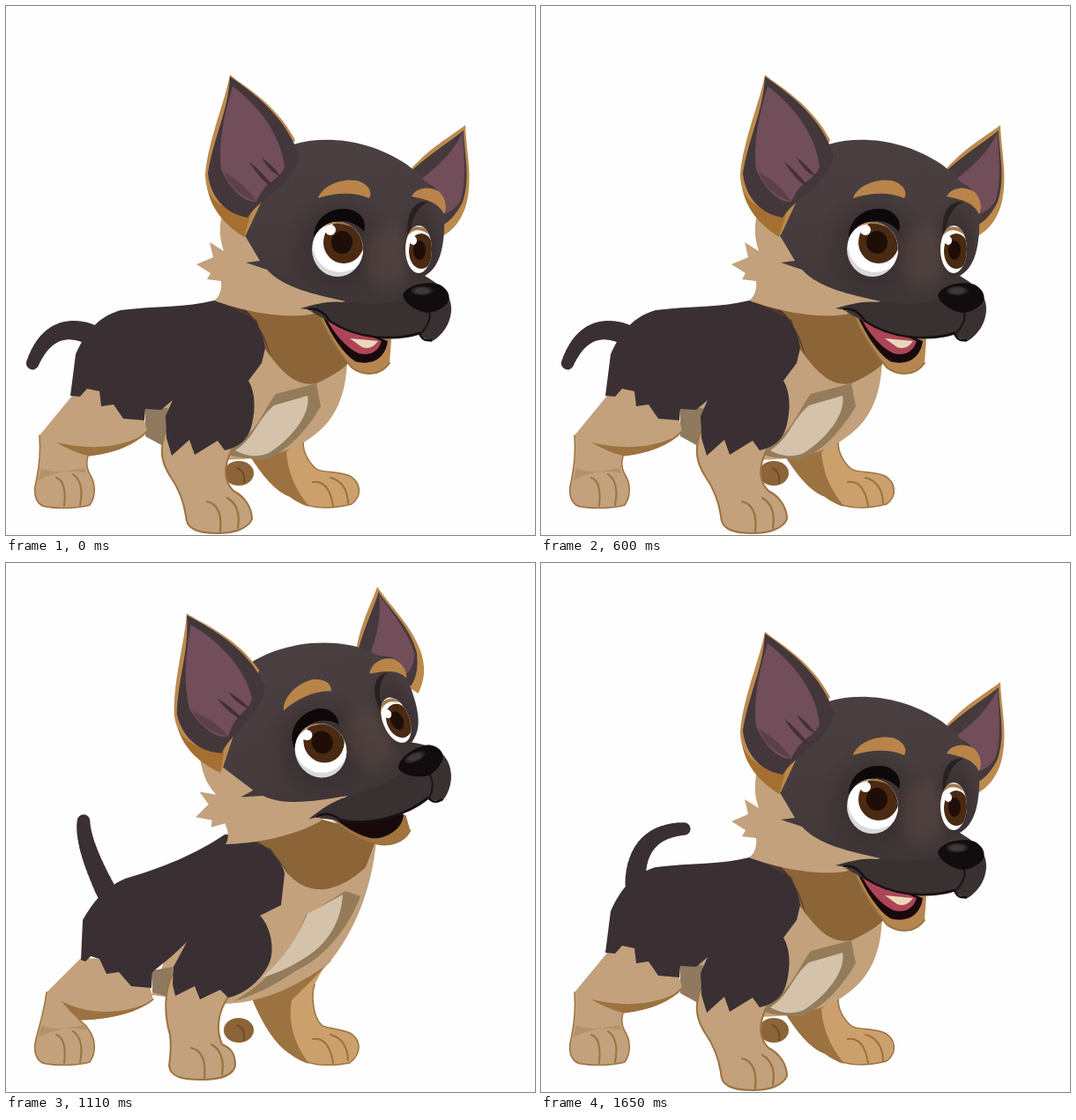
Recreate the animation shown at these times as an HTML page with a canvas. Size 600x600 px, loop 1710 ms.

```html
<!DOCTYPE html>
<html lang="en">
<head>
<meta charset="utf-8">
<title>Puppy</title>
<style>
html, body { margin: 0; width: 100%; height: 100%; overflow: hidden; background: #fefefe; }
canvas { display: block; width: 100vmin; height: 100vmin; }
</style>
</head>
<body>
<canvas id="stage" width="600" height="600"></canvas>
<script>
const ctx = document.getElementById('stage').getContext('2d');
const LOOP = 1710, STEP = 30, LAST = 1650, WAG = 300;
const TAN = '#c2a17c', GOLD = '#bb8a4e', BROWN = '#8b6438', EDGE = '#9c7240';
const COAT = '#3a3033', FACE = '#4a4042', PINK = '#714e59';

// Poses: rise, crouch, head dx, dy, tilt, left ear, right ear, jaw, blink
const REST = [0, 0, 0, 0, 0, 0, 0, 0, 0];
const DIP = [0, 1.1, 4, 14, 5, -14, 26, -1, 0];
const LOW = [0, 1, 2, 8, 3, -10, 15, -1, 0];
const PERK = [0, 0, 2, 1, 1, 10, 0, -.5, 0];
const BARK = [1, 0, 3, 0, -18, 7, -3, 1, 1];
const PROUD = [1, 0, -1, -5, -22, 15, -11, -1, 0];
const KEYS = [
  [0, REST], [140, DIP], [200, LOW], [270, PERK], [300, REST],
  [440, DIP], [500, LOW], [570, PERK], [600, REST],
  [680, DIP], [770, [1, 0, 1, -8, -21, 14, -8, .6, 1]], [810, BARK], [930, BARK],
  [1020, [1, 0, 0, -5, -21, 14, -9, -.6, 0]], [1110, PROUD],
  [1190, [1, 0, -1, -14, -26, 20, -13, -1, 0]], [1350, DIP], [1410, LOW],
  [1530, PERK], [1620, REST], [LOOP, REST]
];

function poseAt(t) {
  const i = KEYS.findIndex(k => k[0] > t);
  const [t0, a] = KEYS[i - 1], [t1, b] = KEYS[i];
  const u = (t - t0) / (t1 - t0), e = u * u * (3 - 2 * u);
  return a.map((v, n) => v + (b[n] - v) * e);
}

// Weighted mean of paths that share one structure
function blend(paths, weights) {
  const nums = paths.map(p => p.match(/\d+/g));
  let n = 0;
  return paths[0].replace(/\d+/g, () => {
    const v = weights.reduce((s, w, i) => s + w * nums[i][n], 0);
    n++;
    return v.toFixed(2);
  });
}

function fill(path, color) {
  ctx.fillStyle = color;
  ctx.fill(new Path2D(path));
}

function line(path, color, width) {
  ctx.strokeStyle = color;
  ctx.lineWidth = width;
  ctx.stroke(new Path2D(path));
}

// Strokes a path up to its first straight segment
const rim = (path, width) => line(path.replace(/L.*$/, ''), EDGE, width);

function oval(x, y, rx, ry, color, turn = 0) {
  ctx.fillStyle = color;
  ctx.beginPath();
  ctx.ellipse(x, y, rx, ry, turn, 0, 7);
  ctx.fill();
}

function glow(x, y, rx, ry, rgb, alpha) {
  ctx.save();
  ctx.translate(x, y);
  ctx.scale(rx, ry);
  const g = ctx.createRadialGradient(0, 0, .5, 0, 0, 1);
  g.addColorStop(0, `rgba(${rgb},${alpha})`);
  g.addColorStop(1, `rgba(${rgb},0)`);
  oval(0, 0, 1, 1, g);
  ctx.restore();
}

function pivot(x, y, deg, scale, draw) {
  ctx.save();
  ctx.translate(x, y);
  ctx.rotate(deg * Math.PI / 180);
  ctx.scale(scale, scale);
  ctx.translate(-x, -y);
  draw();
  ctx.restore();
}

// Resting and risen shapes; the front leg also has a crouched one
const BODY = {
  torso: ['M180 440L270 345L300 350C305 370 335 385 350 385L387 400C386 440 375 470 345 490C320 510 270 517 235 514L160 485Z',
    'M180 450L270 320L310 320C325 340 375 345 400 335L420 315C415 370 395 420 365 455C330 480 290 500 245 500L165 490Z'],
  chest: ['M244 506C285 490 290 460 306 440L352 428L357 454C342 480 320 505 295 514C275 514 258 512 244 506Z',
    'M258 497C290 480 320 450 340 400L385 372L402 378C390 410 365 445 330 462C305 478 285 490 258 497Z'],
  light: ['M260 504C282 490 284 470 304 453L342 442C346 462 325 490 298 507C284 513 270 510 260 504Z',
    'M290 470C315 450 330 425 342 398L382 376C380 405 368 425 350 440C330 455 310 465 290 470Z'],
  neck: ['M245 335L296 392C315 418 330 432 352 428C370 420 385 410 390 403L384 350L300 335Z',
    'M255 305L312 340C322 360 340 372 362 370C385 366 400 352 408 345L422 308L300 275Z'],
  collar: ['M240 334C270 336 292 360 300 398L284 356Z', 'M252 306C285 312 306 325 322 356L300 324Z'],
  belly: ['M158 456L184 456L178 499L158 488Z', 'M166 462L190 458L183 492L166 487Z'],
  patch: ['M73 442L79 395C90 370 105 352 130 345C170 340 205 342 236 334C265 330 290 355 294 388L290 405L275 425C283 438 283 458 279 474C275 492 265 500 248 504L240 493L214 509L208 492L188 510L182 490L181 465L189 447L176 458L158 457L157 470L133 468L122 452L108 454L106 437L92 434L84 443Z',
    'M85 450L87 405C98 385 112 368 135 358C180 345 215 330 248 308C280 305 312 330 316 352L312 388L288 400C300 412 304 435 300 450C294 468 275 488 252 493L243 484L220 495L214 480L192 491L189 478L190 458L205 430L188 446L166 464L165 482L142 480L128 464L114 466L106 449L96 446L90 452Z'],
  rear: ['M38 487C40 515 36 530 34 540C30 555 35 566 45 568C65 571 85 569 95 566C103 555 101 540 95 531C90 522 92 515 93 510C120 507 145 498 160 482L150 440L85 430Z',
    'M46 487C42 515 36 530 34 540C30 555 35 566 45 568C65 571 85 569 95 566C103 555 101 540 95 531C90 522 84 520 83 518C120 517 150 508 167 495L155 450L85 448Z'],
  rearShade: ['M57 495C70 502 80 507 93 510C110 509 140 503 160 484C138 498 104 506 57 495Z',
    'M63 497C72 508 78 514 83 518C110 518 145 513 167 496C140 510 100 516 63 497Z'],
  fore: ['M276 508C290 530 305 550 322 556C340 570 365 572 392 565C405 555 402 540 390 533C375 527 358 530 352 525C340 515 335 500 338 490L345 470Z',
    'M278 490C290 520 305 545 322 556C340 570 365 572 390 567C405 555 402 540 390 533C375 527 362 528 358 524C348 515 346 490 350 478L365 450Z'],
  foreShade: ['M276 508C290 530 305 550 322 556C330 562 336 566 344 568C328 548 320 530 318 506L345 480Z',
    'M278 490C290 520 305 545 322 556C330 562 336 566 344 568C326 545 320 520 324 496L370 450Z'],
  front: ['M182 480C172 505 178 520 186 533C198 550 202 565 204 578C204 592 215 598 240 598C260 598 275 592 279 582C279 568 270 556 258 550C248 540 246 525 255 505L250 470Z',
    'M190 465C178 485 180 515 186 535C188 550 186 562 185 570C186 583 200 586 222 586C245 586 258 580 260 570C260 556 255 550 245 546C238 530 240 510 252 492L270 460Z',
    'M182 480C160 505 160 515 164 526C175 545 198 552 202 562C206 575 222 580 244 580C262 580 275 572 277 560C277 545 270 536 262 532C250 525 228 515 232 500L250 470Z']
};

// Order of each set: closed, smiling, wide open
const JAW = {
  chin: ['M355 346C365 362 378 385 392 395C405 407 425 408 436 398L438 380L420 370Z',
    'M355 348C365 375 380 395 392 410C405 420 425 420 435 405L437 378L420 370Z',
    'M345 355C342 380 338 415 346 440C355 452 380 456 398 442L412 412L430 372Z'],
  mouth: ['M358 348C370 368 382 386 397 392C412 396 430 392 436 378Z',
    'M358 350C370 375 382 394 396 403C412 408 430 402 433 380Z',
    'M347 358C345 380 342 410 350 436C365 446 402 440 426 376Z'],
  tongue: ['M362 352C375 365 390 375 400 378C410 379 420 378 424 376Z',
    'M362 352C372 372 386 388 400 394C410 397 422 394 426 380Z',
    'M362 376C352 400 346 425 352 442C366 450 400 430 408 392Z']
};

const HEAD = 'M266 252C275 215 300 185 326 157C360 147 410 150 455 180C480 200 500 225 497 255C495 285 488 298 475 306C490 315 505 325 505 343C505 360 495 375 480 380L470 372C440 380 400 377 370 360L345 346L385 335C350 327 315 320 296 299L272 291L288 289Z';

function drawTail(t, rise) {
  const s = Math.cos(t / WAG * 2 * Math.PI);
  const polar = (deg, r) => {
    const a = deg * Math.PI / 180;
    return [90 + r * Math.cos(a), 360 + r * Math.sin(a)];
  };
  const root = [101 - 6 * s, 368 + 4 * s];
  const mid = polar(237 - 50 * s, 49 - 9 * s);
  const tip = polar(232 - 89 * s, 73 - 9 * s + 11 * s * s);
  const at = u => root.map((v, i) => v * (1 - u) ** 2 + 2 * mid[i] * u * (1 - u) + tip[i] * u * u);
  ctx.save();
  ctx.translate(12 * rise, 8 * rise);
  const n = 16;
  for (let i = 0; i < n; i++) {
    line(`M${at(i / n)}L${at((i + 1) / n)}`, COAT, 23 - 9 * i / n);
  }
  ctx.restore();
}

function drawBody(rise, crouch) {
  const shape = n => blend(BODY[n], [1 - rise, rise]);
  const lower = draw => {
    ctx.save();
    ctx.translate(100, 8 * crouch);
    ctx.scale(1 + .025 * crouch, 1);
    ctx.translate(-100, 0);
    draw();
    ctx.restore();
  };
  oval(264, 530, 17, 14, BROWN);
  line('M262 524Q272 528 270 541', '#6b4826', 1.5);
  const fore = shape('fore');
  fill(fore, '#cba06c');
  fill(shape('foreShade'), EDGE);
  rim(fore, 1.5);
  line('M348 540Q366 537 371 567M368 535Q387 540 388 564', EDGE, 2);
  lower(() => {
    fill(shape('torso'), TAN);
    fill(shape('chest'), '#947c5b');
    fill(shape('light'), '#d4c3aa');
    fill(shape('neck'), BROWN);
    fill(shape('belly'), '#8f7a60');
  });
  const rear = shape('rear');
  fill(rear, TAN);
  fill(shape('rearShade'), EDGE);
  fill('M40 525C55 530 72 528 88 524L92 530C75 526 55 528 37 538Z', '#b3916a');
  rim(rear, 1.5);
  line('M57 535Q69 539 66 567M76 531Q89 540 84 566', EDGE, 2);

  const front = blend(BODY.front, [1 - rise - crouch, rise, crouch]);
  fill(front, TAN);
  rim(front, 2);
  ctx.save();
  ctx.translate(-18 * rise, -12 * rise - 18 * crouch);
  line('M228 562Q246 566 243 596M251 558Q267 567 263 592', EDGE, 2.2);
  ctx.restore();
  lower(() => {
    fill(shape('patch'), COAT);
    fill(shape('collar'), '#54392e');
  });
}

function drawRightEar() {
  fill('M455 190C480 160 505 148 521 135C522 165 530 195 522 225C515 250 500 258 494 262L480 230Z', GOLD);
  fill('M452 194C482 166 505 153 519 141C520 170 527 195 518 222C510 238 502 246 492 250L470 225Z', '#45393c');
  fill('M470 197C490 182 508 165 518 143C519 170 523 200 515 222C508 232 500 236 494 236C500 218 492 206 470 197Z', PINK);
}

function drawLeftEar() {
  fill('M254 78C268 90 306 110 328 152L300 200L272 260L262 254C240 235 226 215 226 190C230 150 248 110 254 78Z', GOLD);
  fill('M228 205C234 225 250 232 278 235L270 262C248 248 232 230 228 205Z', '#a56f31');
  fill('M254 80C286 102 320 130 332 170C325 205 290 215 274 240C250 236 232 218 229 190C235 150 252 120 254 80Z', '#43373b');
  fill('M257 91C285 112 312 145 316 183C308 200 296 195 284 222C270 224 252 205 244 185C240 150 250 115 257 91Z', PINK);
  fill('M276 177Q290 187 304 206Q290 200 276 177ZM290 172Q302 180 312 194Q298 188 290 172Z', '#432f37');
  fill('M247 188C255 208 268 216 284 222C274 206 260 196 247 188Z', '#5b4049');
}

function drawEyes(blink) {
  const lids = 1 - blink;
  fill('M349 262C349 240 370 226 392 231C405 236 409 246 406 256C390 238 365 240 349 262Z', '#0d090a');
  fill('M456 262C453 235 463 220 479 222C466 228 459 242 458 264Z', '#282021');
  if (blink > .05) {
    oval(379, 273, 33, 39, '#050304');
    oval(467, 278, 17, 28, '#050304');
  }
  if (lids > .05) {
    const open = (x, y, rx, ry, draw) => {
      ctx.save();
      ctx.translate(x, y);
      ctx.scale(1, lids);
      ctx.beginPath();
      ctx.ellipse(0, 0, rx, ry, 0, 0, 7);
      ctx.clip();
      ctx.translate(-x, -y);
      draw();
      ctx.restore();
    };
    open(376, 276, 29, 31, () => {
      oval(376, 276, 30, 32, '#d9d9dc');
      oval(379, 270, 31, 32, '#fff');
      oval(383, 268, 23, 24, '#4a2a12');
      oval(381, 268, 12, 13, '#1f0e07');
      oval(368, 254, 6, 6, '#fff');
      line('M352 253Q376 234 406 256', '#a47b50', 5);
    });
    open(468, 276, 15, 27, () => {
      oval(468, 276, 16, 28, '#fff');
      oval(471, 278, 14, 20, '#4a2a12');
      oval(469, 277, 7, 11, '#1f0e07');
      oval(462, 266, 4, 5, '#fff');
      line('M453 261Q465 244 484 260', '#a47b50', 4);
    });
  }
  if (blink > .4) {
    fill('M346 270Q373 292 412 283Q373 303 346 270Z', '#ad8152');
    fill('M450 282Q465 297 485 296Q465 305 450 282Z', '#ad8152');
  }
}

function drawJaw(k) {
  const w = [Math.max(0, -k), 1 - Math.abs(k), Math.max(0, k)];
  const chin = blend(JAW.chin, w);
  fill(chin, k < -.6 ? '#a0733f' : '#b58650');
  rim(chin, 2);
  fill(blend(JAW.mouth, w), '#180a0c');
  if (k > -.8) fill(blend(JAW.tongue, w), k > 0 ? '#c4577a' : '#ad4557');
  if (k > 0) {
    ctx.globalAlpha = k;
    fill('M366 394C376 382 383 398 387 404C398 394 402 408 392 418C382 430 366 437 357 429C353 418 357 404 366 394Z', '#de8295');
    oval(361, 431, 6, 3, '#efb4b6', .4);
    ctx.globalAlpha = 1;
  } else if (k > -.6) {
    fill('M390 377L422 380Q414 391 404 387Z', '#e9d8bd');
  }
}

function drawFace() {
  const coat = ctx.createLinearGradient(360, 150, 370, 370);
  coat.addColorStop(0, FACE);
  coat.addColorStop(.5, '#463c3e');
  coat.addColorStop(1, '#3b3234');
  fill(HEAD, coat);
  ctx.save();
  ctx.clip(new Path2D(HEAD));
  glow(378, 270, 62, 64, '47,38,40', .45);
  glow(470, 270, 28, 55, '47,38,40', .4);
  glow(432, 285, 34, 46, '104,80,67', .3);
  ctx.restore();
  fill('M334 343C352 338 366 334 384 336C415 340 438 338 453 332C465 348 488 350 504 338C507 356 496 374 482 381L468 373C440 382 400 377 370 360L354 346Z', '#393032');
  line('M344 344Q358 342 367 357C398 378 438 380 469 371Q472 381 482 379', '#171012', 2.5);
  line('M480 347Q483 358 471 371', '#1c1416', 2);
}

function drawHead([, , dx, dy, tilt, earL, earR, jaw, blink]) {
  ctx.save();
  ctx.translate(dx, dy);
  pivot(217, 293, tilt, 1, () => {
    pivot(475, 215, earR, 1 + Math.max(0, earR) / 110, drawRightEar);
    drawJaw(jaw);
    fill('M245 235C240 260 245 270 247 278L231 268L235 285L216 293L232 303L228 310L244 312C245 322 242 330 236 334C265 345 310 355 345 350C360 345 375 342 390 335L400 300L300 235Z', TAN);
    drawFace();
    pivot(285, 225, earL, 1, drawLeftEar);
    fill('M354 218C358 205 378 195 398 198C412 202 416 212 412 218C395 210 372 212 354 218Z', '#b98449');
    fill('M460 216C465 206 480 203 492 211C500 220 500 230 497 236C490 222 475 219 460 216Z', '#b98449');
    drawEyes(blink);
    fill('M450 328C455 315 480 312 492 316C503 322 505 332 500 338C490 347 480 350 470 346C460 342 452 336 450 328Z', '#110c0d');
    glow(472, 323, 14, 6, '110,98,100', .5);
  });
  ctx.restore();
}

function render(now) {
  const t = Math.min(LAST, Math.floor(now % LOOP / STEP) * STEP);
  const pose = poseAt(t);
  ctx.fillStyle = '#fefefe';
  ctx.fillRect(0, 0, 600, 600);
  ctx.lineCap = ctx.lineJoin = 'round';
  drawTail(t, pose[0]);
  drawBody(pose[0], pose[1]);
  drawHead(pose);
}

const start = performance.now();
function tick() {
  render(performance.now() - start);
  requestAnimationFrame(tick);
}
tick();
</script>
</body>
</html>
```
